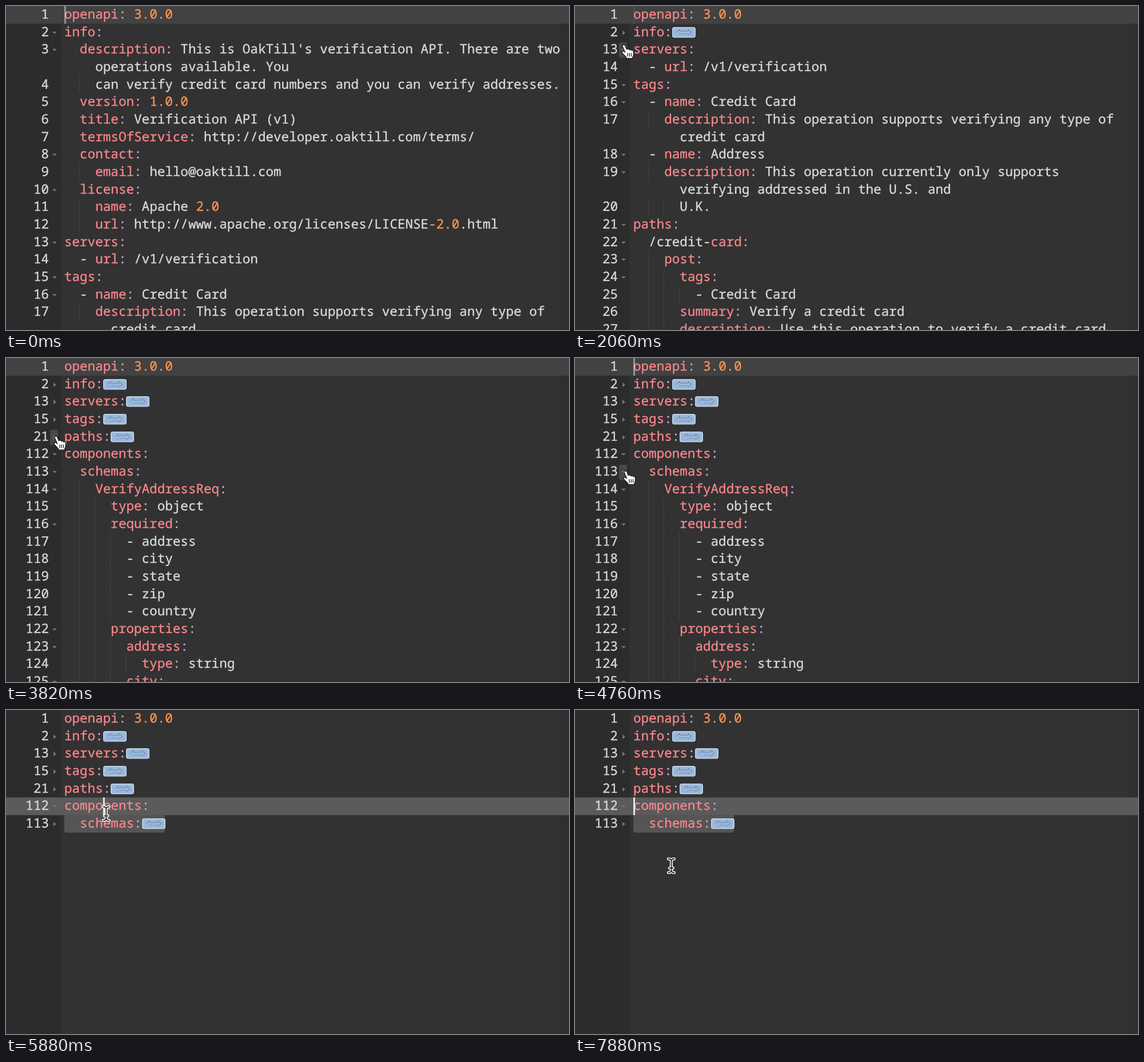
An HTML page for the animation above (9.12 s loop, 985 px wide and 568 px high).

```html
<!DOCTYPE html>
<html lang="en">
<head>
<meta charset="utf-8">
<title>Folding an API definition</title>
<style>
  :root { --row: 30.66px; --left: 102px; }
  html, body { margin: 0; width: 100%; height: 100%; overflow: hidden; background: #323232; }
  #stage {
    position: relative; width: 985px; height: 568px; overflow: hidden; background: #323232;
    font: 22.6px/var(--row) "Noto Sans Mono", "DejaVu Sans Mono", monospace;
    font-variant-ligatures: none; text-rendering: geometricPrecision;
    -webkit-text-stroke: .35px; color: #dadada;
  }
  #stage div, #stage .abs, #stage svg { position: absolute; }
  .gutter { left: 0; top: 0; width: 96px; height: 100%; background: #2c2c2c; }
  .strip { right: 0; top: 0; width: 15px; height: 100%; background: #2f2f2f; }
  #active { left: 0; top: 0; width: 100%; height: var(--row); background: #424242; }
  #active.selected { background: #5b5b5b; }
  #selection { height: var(--row); background: #555; border-radius: 0 0 4px 4px; }
  #hover { left: 77px; top: 3px; width: 14px; height: 27px; background: #484848; border-radius: 3px; }
  .view { left: 0; top: 0; width: 100%; height: 100%; }
  .row { left: 0; width: 100%; height: var(--row); white-space: pre; }
  .num { right: 910px; top: -1px; }
  .code { left: var(--left); top: -1px; }
  .guide {
    top: 0; width: 1px; height: 100%;
    background: repeating-linear-gradient(#626262 0 1px, transparent 1px 3px);
  }
  .arrow { left: 81px; top: 14px; border: 4px solid transparent; border-top-color: #747474; border-bottom: 0; }
  .arrow.closed { left: 83px; top: 12px; border: 4px solid transparent; border-left: 5px solid #747474; border-right: 0; }
  .key { color: #f9868c; }
  .colon { color: #d3a2d3; }
  .number { color: #ff9655; }
  .string { color: #9bd39b; }
  .pill { top: 6px; }
  #caret { left: 0; top: 0; width: 2.5px; height: var(--row); background: #e6e6e6; }
  #mouse { left: 0; top: 0; overflow: visible; }
</style>
</head>
<body>
<div id="stage">
  <div class="gutter"></div>
  <div class="strip"></div>
  <div id="active"></div>
  <div id="selection"></div>
  <div id="hover"></div>
  <div id="views" class="view"></div>
  <div id="caret"></div>
  <svg id="mouse" width="1" height="1">
    <defs><path id="beamShape" d="M-5-12Q0-12 0-8V8Q0 12-5 12M5-12Q0-12 0-8M5 12Q0 12 0 8M-3 4H3"/></defs>
    <g id="beam" fill="none" stroke-linecap="round">
      <use href="#beamShape" stroke="#fff" stroke-width="5"/>
      <use href="#beamShape" stroke="#222" stroke-width="1.8"/>
    </g>
    <g id="hand" transform="translate(-2.5 0)" stroke="#1c1c1c" stroke-linejoin="round" stroke-linecap="round">
      <path fill="#fff" stroke-width="1.4" d="M-2.5 2.5C-2.5-1 1.5-1 2.5 2L5 8C7 6 9 7 9.5 9C11 7.5 13 8.5 13.5 10C15 9 17 10 17 12V17C17 20 15 21 15 24H5C4 20-1 18-3 14C-4 11-1 10 1 12L2 13Z"/>
      <path fill="none" stroke-width="1.3" d="M6.5 15v5M9.8 15v5M13 15v5"/>
    </g>
  </svg>
</div>
<script>
const LOOP = 9120, ROW = 30.66, COL = 13.56, LEFT = 102, GUTTER_EDGE = 98, VISIBLE_ROWS = 19;
const $ = id => document.getElementById(id);

// ">" marks a foldable line, "~" a soft-wrapped continuation.
const sections = [
  { first: 1, text: `
 openapi: 3.0.0` },
  { first: 2, foldAt: 1410, text: `
>info:
>  description: This is OakTill's verification API. There are two
~    operations available. You
     can verify credit card numbers and you can verify addresses.
   version: 1.0.0
   title: Verification API (v1)
   termsOfService: http://developer.oaktill.com/terms/
>  contact:
     email: hello@oaktill.com
>  license:
     name: Apache 2.0
     url: http://www.apache.org/licenses/LICENSE-2.0.html` },
  { first: 13, foldAt: 2180, text: `
>servers:
   - url: /v1/verification` },
  { first: 15, foldAt: 2880, text: `
>tags:
>  - name: Credit Card
     description: This operation supports verifying any type of
~      credit card
>  - name: Address
>    description: This operation currently only supports
~      verifying addressed in the U.S. and
       U.K.` },
  { first: 21, foldAt: 3530, text: `
>paths:
>  /credit-card:
>    post:
>      tags:
         - Credit Card
       summary: Verify a credit card
       description: Use this operation to verify a credit card
~        number.
       operationId: verifyCreditCard
>      requestBody:
>        content:
>          application/json:
>            schema:
               $ref: "#/components/schemas/VerifyCreditCardReq"
         description: JSON payload with the credit card details` },
  { first: 112, text: `
>components:` },
  { first: 113, foldAt: 4820, text: `
>  schemas:
>    VerifyAddressReq:
       type: object
>      required:
         - address
         - city
         - state
         - zip
         - country
>      properties:
>        address:
           type: string
>        city:` },
];

const pill = left => `<svg class="pill" style="left:${left}px" width="41" height="19">
  <rect x=".8" y=".8" width="39.4" height="17" rx="3" fill="#9ab8da" stroke="#c9d9ea" stroke-width="1.5"/>
  <path d="M7 9l6-5v3h15v-3l6 5-6 5v-2M13 12v2z" fill="none" stroke="#7494bd" stroke-width="1.3"/>
  <path d="M16 12h10" stroke="#7494bd" stroke-width="2" stroke-dasharray="2"/>
</svg>`;

const paint = (name, text) => `<span class="${name}">${text}</span>`;

function highlight(text) {
  const found = /^(\s*\w[^:]*?)(:)(?=\s|$)/.exec(text) || /(\w+)(:)(?=\s|$)/.exec(text);
  const end = found ? found.index + found[0].length : 0;
  const head = found ? text.slice(0, found.index) + paint("key", found[1]) + paint("colon", ":") : "";
  return head + text.slice(end).replace(/".*"|-?\b\d+(\.\d+)+/g,
    part => paint(part[0] === '"' ? "string" : "number", part));
}

function rowHtml({ mark, text, number, folded }, index) {
  const indent = text.search(/\S/);
  let html = `<span class="abs num">${number}</span><span class="abs code">${highlight(text)}</span>`;
  if (mark === ">") html += `<div class="arrow${folded ? " closed" : ""}"></div>`;
  if (mark !== "~")
    for (let col = 2; col < indent; col += 2)
      html += `<div class="guide" style="left:${LEFT + col * COL - 1}px"></div>`;
  if (folded) html += pill(LEFT + text.length * COL);
  return `<div class="row" style="top:${index * ROW}px">${html}</div>`;
}

function rowsAt(time) {
  return sections.flatMap(({ first, foldAt, text }) => {
    const folded = foldAt <= time;
    let number = first;
    const rows = text.slice(1).split("\n").map(line => ({
      mark: line[0], text: line.slice(1), folded,
      number: line[0] === "~" ? "" : number++,
    }));
    return folded ? rows.slice(0, 1) : rows;
  }).slice(0, VISIBLE_ROWS);
}

const foldTimes = sections.map(section => section.foldAt).filter(Boolean);
const views = [0, ...foldTimes].map(time => {
  const view = document.createElement("div");
  view.className = "view";
  view.innerHTML = rowsAt(time).map(rowHtml).join("");
  $("views").append(view);
  return view;
});

const DRAG_START = 5600, DRAG_END = 6410;
const entry = { x: 281, y: 600 };
const moves = [
  { from: 290, to: 1180, x: 88, y: 42 },
  { from: 1650, to: 2060, x: 88, y: 68 },
  { from: 2410, to: 2820, x: 90, y: 107 },
  { from: 3120, to: 3530, x: 90, y: 137 },
  { from: 3820, to: 4710, x: 91, y: 198 },
  { from: 5060, to: 5470, x: 329, y: 211 },
  { from: 5470, to: DRAG_END, x: 104, y: 168 },
  { from: 7120, to: 7650, x: 168.5, y: 273 },
];

const clamp = (value, low, high) => Math.min(high, Math.max(low, value));
const easeOut = p => 1 - (1 - p) ** 2;
const place = (el, x, y) => { el.style.transform = `translate(${x}px, ${y}px)`; };
const show = (el, on) => { el.style.visibility = on ? "visible" : "hidden"; };

function mouseAt(time) {
  return moves.reduce((pos, { from, to, x, y }) => {
    const p = easeOut(clamp((time - from) / (to - from), 0, 1));
    return { x: pos.x + (x - pos.x) * p, y: pos.y + (y - pos.y) * p };
  }, entry);
}

// The caret blinks once a second; clicks restart it, and it stays lit at the end.
const BLINK_END = 7900;
const restarts = [-600, 1410, 2180, 2880, 3160, 4820, 5850];
function blinkAt(time) {
  const t = Math.min(time, BLINK_END);
  const phase = (t - restarts.filter(restart => restart <= t).pop()) % 1000;
  return phase < 940 ? clamp(1 - (phase - 540) / 120, 0, 1) : (phase - 940) / 60;
}

// Dragging selects from the end of the folded last line back to the caret.
const LAST_ROW = 6, LAST_COL = 13;
function caretAt(time) {
  if (time < DRAG_START) return { row: 0, col: 0 };
  const { x, y } = mouseAt(Math.min(time, DRAG_END));
  return { row: Math.floor(y / ROW), col: clamp(Math.round((x - LEFT) / COL), 0, LAST_COL) };
}

function render(time) {
  const step = foldTimes.filter(fold => fold <= time).length;
  views.forEach((view, i) => show(view, i === step));

  const mouse = mouseAt(time), inGutter = mouse.x < GUTTER_EDGE;
  place($("mouse"), mouse.x, mouse.y);
  show($("hand"), inGutter);
  show($("beam"), !inGutter);
  show($("hover"), inGutter);
  place($("hover"), 0, Math.floor(mouse.y / ROW) * ROW);

  const { row, col } = caretAt(time);
  place($("caret"), LEFT + col * COL, row * ROW);
  $("caret").style.opacity = blinkAt(time);
  place($("active"), 0, row * ROW);

  const aboveLast = row < LAST_ROW;
  const start = aboveLast ? 0 : col;
  $("active").classList.toggle("selected", time >= DRAG_START && aboveLast);
  show($("selection"), time >= DRAG_START);
  place($("selection"), LEFT + start * COL, LAST_ROW * ROW);
  $("selection").style.width = (LAST_COL - start) * COL + "px";
}

const begin = performance.now();
function tick() {
  render((performance.now() - begin) % LOOP);
  requestAnimationFrame(tick);
}
tick();
</script>
</body>
</html>
```
